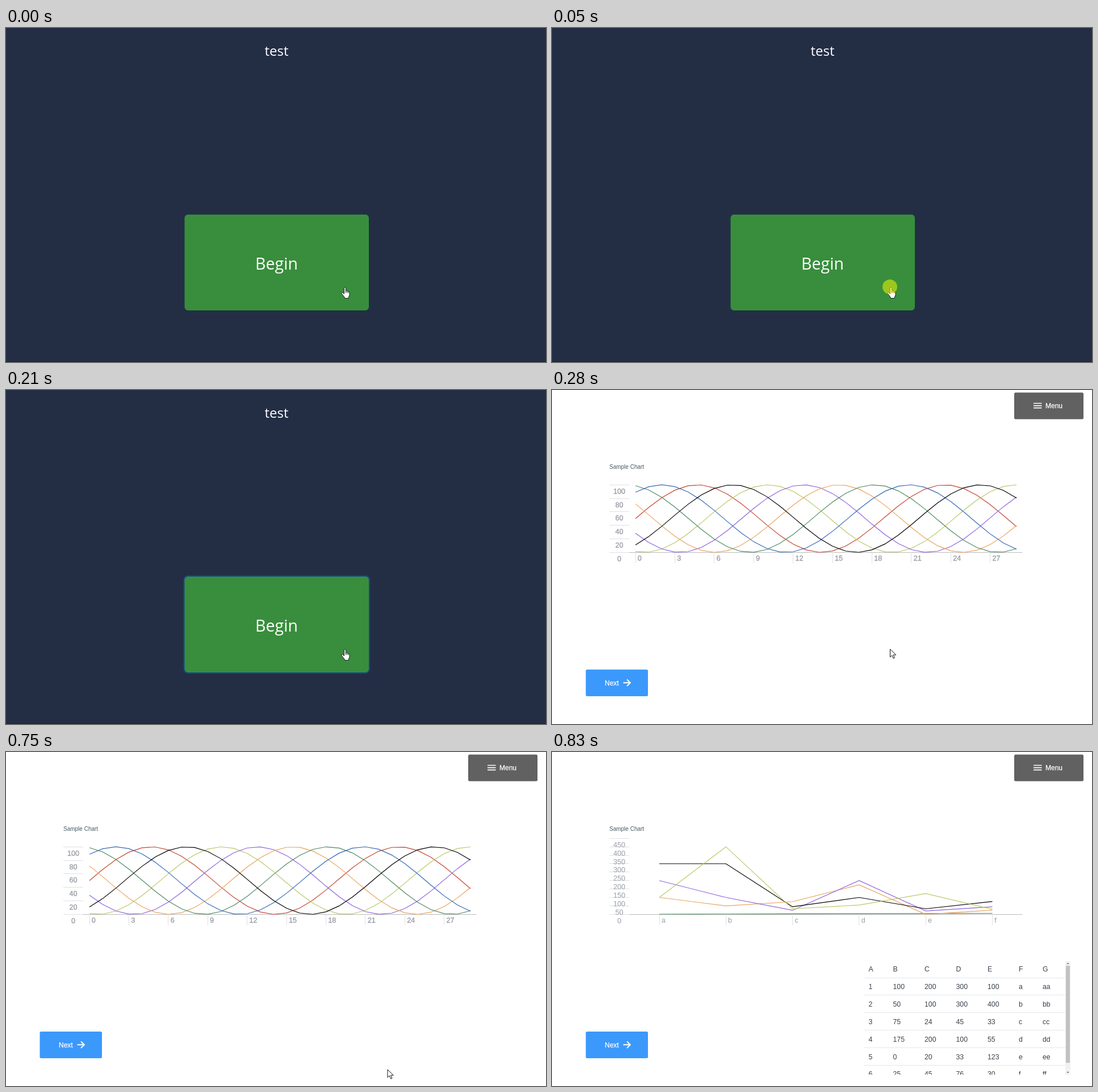
Recreate the animation shown at these times as an HTML page. Size 951 by 589 pixels, loop 1140 ms.

```html
<!DOCTYPE html>
<html lang="en">
<head>
<meta charset="utf-8">
<title>Begin and charts</title>
<style>
  html, body { margin: 0; width: 100%; height: 100%; overflow: hidden; background: #fff; }
  svg { display: block; font-family: "Liberation Sans", Arial, sans-serif; }
  .start { font-family: "Open Sans", "Noto Sans", sans-serif; fill: #fff; text-anchor: middle; }
  .label { font-size: 12.6px; fill: #989da5; }
  .strong { stroke: #989da5; stroke-width: .35; }
  .button { font-size: 12px; fill: #fff; stroke: #fff; stroke-width: .25; }
  .cell { font-size: 12.3px; fill: #39424e; }
  .plot { fill: none; stroke-width: 1.15; }
</style>
</head>
<body>
<svg width="951" height="589" viewBox="0 0 951 589">
  <g id="intro">
    <rect width="951" height="589" fill="#232e45"/>
    <rect y="588" width="951" height="1" fill="#1a2335"/>
    <text class="start" x="476.500" y="48.500" font-size="24">test</text>
    <rect id="ring" fill="#007bff"/>
    <rect x="314.500" y="329" width="324.500" height="169" rx="6" fill="#388e3c"/>
    <text class="start" x="476.500" y="426" font-size="28.500">Begin</text>
    <path fill="#fff" stroke="#1c2420" stroke-width="1" stroke-linejoin="round" d="M595.5 469v-10.2a1.4 1.4 0 0 1 2.8 0v4.2q2.300-.8 2.400.8q2.200-.6 2.300 1q2-.2 2 1.700v4.500l-1.700 3.500v2h-7v-1.500l-5-6.500q-.9-1.700.8-2.200q1.500 0 3.400 2.700zM598.3 463v4M600.7 464v3M603 465v2.500"/>
    <circle id="press" cx="595" cy="456.500" r="13" fill="#ff0" opacity=".5"/>
  </g>
  <g id="page">
    <rect width="951" height="589" fill="#fff"/>
    <rect x="814" y="4.500" width="122" height="47" rx="2.500" fill="#616161"/>
    <path d="M848 23.500h14.500M848 27.600h14.500M848 31.700h14.500" stroke="#fff" stroke-width="1.700"/>
    <text class="button" x="869" y="32">Menu</text>
    <rect x="59.500" y="493" width="109.500" height="47" rx="2.500" fill="#3b99fc"/>
    <text class="button" x="93" y="521">Next</text>
    <path d="M125.500 516.300h12M132 510.500l5.800 5.800-5.800 5.800" fill="none" stroke="#fff" stroke-width="2"/>
    <text x="101" y="139" font-size="10" fill="#455a64">Sample Chart</text>
    <g id="waves"></g>
    <g id="data"></g>
    <path id="arrow" d="M0 0v14l3.300-3.100 2.400 5.500 2.200-1-2.300-5.300h4.700z" fill="#fff" stroke="#111"/>
  </g>
</svg>
<script>
const $ = id => document.getElementById(id);
const show = (id, on) => $(id).style.display = on ? '' : 'none';

const BASE = 286.3;
const COLORS = { red: '#c6432f', black: '#000', olive: '#b7c765', purple: '#8d60df',
                 orange: '#e9a25b', green: '#4b8960', blue: '#3468b5' };

const text = (x, y, s, cls, extra = '') => `<text x="${x}" y="${y}" class="${cls}" ${extra}>${s}</text>`;
const line = (d, color) => `<path d="${d}" stroke="${color}"/>`;

function axes(yLabels, gap, xLabels, x0, step, cls) {
  let out = line('M136 286.5H828.5', '#bbb');
  yLabels.forEach((s, i) => {
    const y = BASE - i * gap;
    out += line(`M101 ${Math.floor(y) + .5}h35`, '#e0e0e0') + text(118.5, y + 15.5, s, cls, 'text-anchor="middle"');
  });
  xLabels.forEach((s, i) => {
    const x = x0 + i * step;
    out += line(`M${Math.floor(x) + .5} 286v19.5`, '#e0e0e0') + text(x + 3.8, 301, s, cls);
  });
  return out;
}

const plot = (values, color, x0, step, scale) =>
  `<polyline class="plot" stroke="${COLORS[color]}" points="${
    values.map((v, i) => `${x0 + i * step},${BASE - v * scale}`).join(' ')}"/>`;

const range = (n, f) => Array.from({ length: n }, (_, i) => f(i));

// Seven sine waves, evenly spread in phase; black is painted last.
const WAVE_STEP = 23.14;
$('waves').innerHTML =
  axes(range(6, i => i * 20), 23.82, range(10, i => i * 3), 147, WAVE_STEP * 3, 'label strong') +
  ['red', 'olive', 'purple', 'orange', 'green', 'blue', 'black'].map(color => {
    const phase = Object.keys(COLORS).indexOf(color) * 2 * Math.PI / 7;
    return plot(range(30, i => 50 + 50 * Math.sin(i / 3 - phase)), color, 147, WAVE_STEP, 1.191);
  }).join('');

const rows = [
  [1, 100, 200, 300, 100, 'a', 'aa'],
  [2, 50, 100, 300, 400, 'b', 'bb'],
  [3, 75, 24, 45, 33, 'c', 'cc'],
  [4, 175, 200, 100, 55, 'd', 'dd'],
  [5, 0, 20, 33, 123, 'e', 'ee'],
  [6, 25, 45, 76, 30, 'f', 'ff']
];
const columns = [557.5, 600.5, 656, 711.5, 767, 822, 864];

function table() {
  const cells = [[...'ABCDEFG'], ...rows].map((row, r) =>
    row.map((s, c) => text(columns[c], 387.3 + r * 30.85, s, 'cell')).join('') +
    line(`M550 ${Math.floor(398 + r * 30.85) + .5}H904`, '#e4e7ea')).join('');
  return `<svg width="951" height="569" overflow="hidden">${cells}</svg>
    <rect x="904" y="369" width="9" height="200" fill="#f1f1f1"/>
    <rect x="905" y="377" width="7" height="171" fill="#c1c1c1"/>
    <path d="M906.500 374l2-2 2 2zM906.500 564l2 2 2-2z" fill="#505050"/>`;
}

$('data').innerHTML =
  axes(range(10, i => i * 50), 14.89, rows.map(r => r[5]), 189, 117.3, 'label') +
  ['green', 'orange', 'purple', 'black', 'olive'].map((color, i) =>
    plot(rows.map(r => r[[0, 1, 2, 3, 4][i]]), color, 189, 117.3, .2978)).join('') +
  table();

function setRing(grow, alpha) {
  const box = { x: 314.5 - grow, y: 329 - grow, width: 324.5 + 2 * grow, height: 169 + 2 * grow,
                rx: 6 + grow, opacity: alpha };
  for (const key in box) $('ring').setAttribute(key, box[key]);
}

function draw(t) {
  show('intro', t < 280);
  show('page', t >= 280);
  show('press', t >= 50 && t < 210);
  if (t < 140) setRing(0, 0);
  else if (t < 210) setRing(1.3, .22);
  else setRing(2.2, .33);

  show('waves', t < 830);
  show('data', t >= 830);
  show('arrow', t < 830);
  const [x, y] = t < 680 ? [595.5, 457] : t < 750 ? [627, 458] : [672, 560];
  $('arrow').setAttribute('transform', `translate(${x} ${y})`);
}

const start = performance.now();
function tick() {
  draw((performance.now() - start) % 1140);
  requestAnimationFrame(tick);
}
tick();
</script>
</body>
</html>
```
